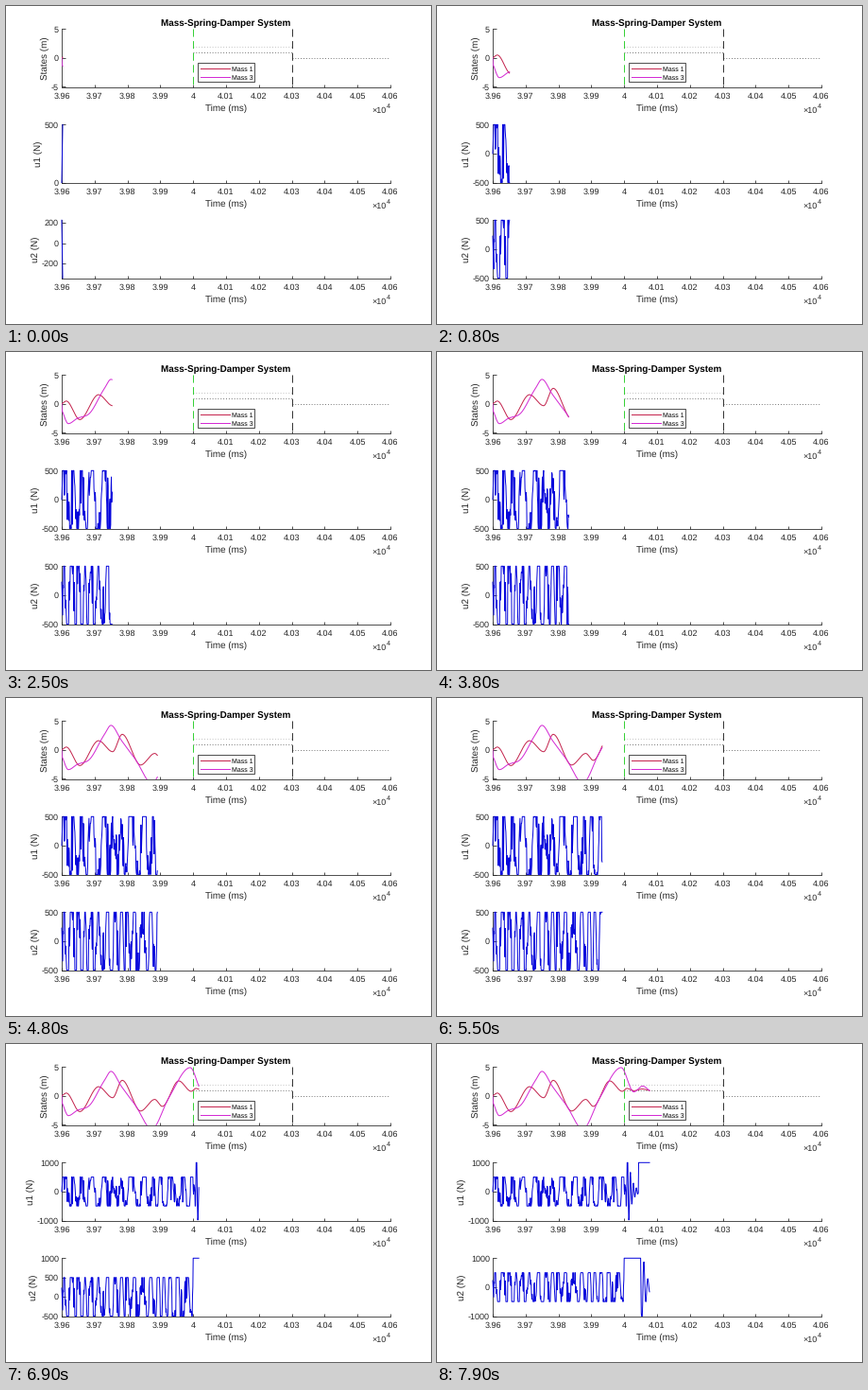
Animation, 450 px wide and 336 px high, one loop 8 s. Source, as a matplotlib script:

```python
import numpy as np
import matplotlib.pyplot as plt
from matplotlib.animation import FuncAnimation
from matplotlib.lines import Line2D
from matplotlib.patches import Rectangle

W, H = 450, 336
LEFT, RIGHT = 59, 407
T0, SPAN = 39600, 1000
FRAMES, STEP, LEAD = 80, 6, 4
INK, RED, PINK, BLUE = "#262626", "#c4264f", "#d42bd4", "#0808dc"

plt.rcParams.update({
    "font.family": "Liberation Sans",
    "axes.unicode_minus": False,
    "text.hinting": "none",
    "text.color": INK,
})

t = np.arange(STEP * FRAMES + LEAD)


def curve(*knots):
    """Smooth path through (ms, metres) knots, level at each turning point."""
    x, v = np.array(knots, float).T
    m = np.gradient(v, x)
    d = np.diff(v)
    m[1:-1][d[1:] * d[:-1] < 0] = 0
    i = np.clip(np.searchsorted(x, t, side="right") - 1, 0, len(x) - 2)
    h = x[i + 1] - x[i]
    s = np.clip((t - x[i]) / h, 0, 1)
    rise = s * s * (3 - 2 * s)
    return (v[i] + (v[i + 1] - v[i]) * rise
            + h * s * (1 - s) * (m[i] * (1 - s) - m[i + 1] * s))


def bang(first, last, period, phase, seed):
    """Noisy oscillating force that saturates at 500 N."""
    rng = np.random.default_rng(seed)
    wobble = 1.3 * np.sin(t / 19 + seed)
    noise = np.repeat(rng.normal(size=len(t) // 2 + 1), 2)[:len(t)]
    wave = np.sin(2 * np.pi * t / period + phase + wobble)
    u = np.clip(720 * wave + 330 * noise, -500, 500)
    u[:LEAD] = np.linspace(first, last, LEAD)
    return u


def ring(peak, period, sign):
    """Decaying oscillation limited to 1000 N."""
    s = t - peak
    wave = np.cos(2 * np.pi * s / period) * np.exp(-s / 11)
    return np.clip(1500 * sign * wave, -1000, 1000)


mass1 = curve((0, 0), (14, .5), (55, -2.7), (112, 1.6), (155, -.3), (184, 2.7),
              (240, -2.6), (283, -.6), (306, -1.8), (356, 2.6), (394, .8),
              (408, 1.3), (430, .9), (454, 1.2), (480, .9))
mass3 = curve((0, -1), (20, -3.4), (47, -2.5), (85, -1.6), (129, 2.6),
              (150, 4.25), (181, 1.7), (224, -1.6), (274, -5.7), (325, -.4),
              (391, 4.9), (429, .7), (456, 1.7), (480, .8))
mass3[0] = 0

u1 = np.select([t < 408, t < 444],
               [bang(0, 500, 30, .6, 4), ring(410, 9, 1)], 1000)
u2 = np.select([t < 400, t < 447],
               [bang(225, -344, 22, .3, 9), 1000], ring(454, 12, -1))

fig = plt.figure(figsize=(W / 72, H / 72), dpi=72, facecolor="white")


def text(x, y, s, size=9.9, **kw):
    return fig.text(x / W, 1 - y / H, s, fontsize=size, **kw)


def panel(top, name):
    bottom = top + 61.2
    ax = fig.add_axes([LEFT / W, 1 - bottom / H, (RIGHT - LEFT) / W,
                       (bottom - top) / H], facecolor="none")
    ax.spines[["top", "right"]].set_visible(False)
    ax.spines[["left", "bottom"]].set(color=INK, linewidth=0.8)
    ax.tick_params(direction="in", length=3.5, width=0.8, color=INK,
                   labelcolor=INK, labelsize=9)
    ax.tick_params(axis="x", pad=6)
    ax.tick_params(axis="y", pad=3)
    ax.set_xlim(T0, T0 + SPAN)
    ticks = np.arange(T0, T0 + SPAN + 1, 100)
    ax.set_xticks(ticks, [f"{v / 1e4:g}" for v in ticks])
    text((LEFT + RIGHT) / 2, bottom + 25.5, "Time (ms)", ha="center")
    text(402.5, bottom + 27, "×10", 9, ha="right")
    text(403, bottom + 22.5, "4", 7.2)
    label = text(0, (top + bottom) / 2 + .4, name, rotation=90,
                 ha="center", va="center")
    return ax, label


def set_y(ax, label, lo, hi, step):
    """Set the y range and keep the axis name clear of the tick labels."""
    ticks = np.arange(np.ceil(lo / step) * step, hi + 1, step)
    names = [f"{v:.0f}" for v in ticks]
    ax.set_ylim(lo, hi)
    ax.set_yticks(ticks, names)
    width = max(5 * len(s.strip("-")) + 3 * s.count("-") for s in names)
    label.set_x((49 - width) / W)


def auto_range(v):
    lo, hi = v.min(), v.max()
    if max(-lo, hi) < 500:
        return lo, hi, 200
    lo, hi = 500 * np.floor(lo / 500), 500 * np.ceil(hi / 500)
    return lo, hi, 1000 if hi - lo >= 2000 else 500


states, states_label = panel(24.3, "States (m)")
set_y(states, states_label, -5, 5, 5)
text(233, 21, "Mass-Spring-Damper System", ha="center", weight="bold",
     color="black")

for start, end, y, c in ((400, 700, 2, "#b8b8b8"), (400, 700, 1, "#606060"),
                         (700, 1000, 0, "#606060")):
    states.plot([T0 + start, T0 + end], [y, y], color=c, lw=0.9,
                linestyle=(0, (1, 2.2)))
for x, c in ((400, "#22cc22"), (700, "#202020")):
    states.plot([T0 + x] * 2, [5, -5], color=c, lw=0.9,
                linestyle=(0, (9, 5)))

curves = [(states.plot([], [], color=c, lw=1, zorder=3)[0], v)
          for c, v in ((RED, mass1), (PINK, mass3))]

inputs = []
for top, name, u in ((125.3, "u1 (N)", u1), (226.3, "u2 (N)", u2)):
    ax, label = panel(top, name)
    line, = ax.plot([], [], color=BLUE, lw=1, clip_on=False, zorder=3)
    curves.append((line, u))
    inputs.append((ax, label, u))

# Legend
fig.add_artist(Rectangle((203 / W, 1 - 80.3 / H), 60 / W, 20.6 / H,
                         facecolor="white", edgecolor=INK, lw=0.8))
for y, c, name in ((66.3, RED, "Mass 1"), (75.3, PINK, "Mass 3")):
    fig.add_artist(Line2D([206 / W, 237 / W], [1 - y / H] * 2, color=c, lw=1))
    text(239, y + 2.7, name, 7, color="black", zorder=5)


def update(k):
    n = STEP * k + LEAD
    for line, v in curves:
        line.set_data(T0 + t[:n], v[:n])
    for ax, label, u in inputs:
        set_y(ax, label, *auto_range(u[:n]))
    return [line for line, _ in curves]


anim = FuncAnimation(fig, update, frames=FRAMES, interval=100, repeat=True,
                     repeat_delay=0, init_func=lambda: update(0), blit=False)
plt.show()
```
